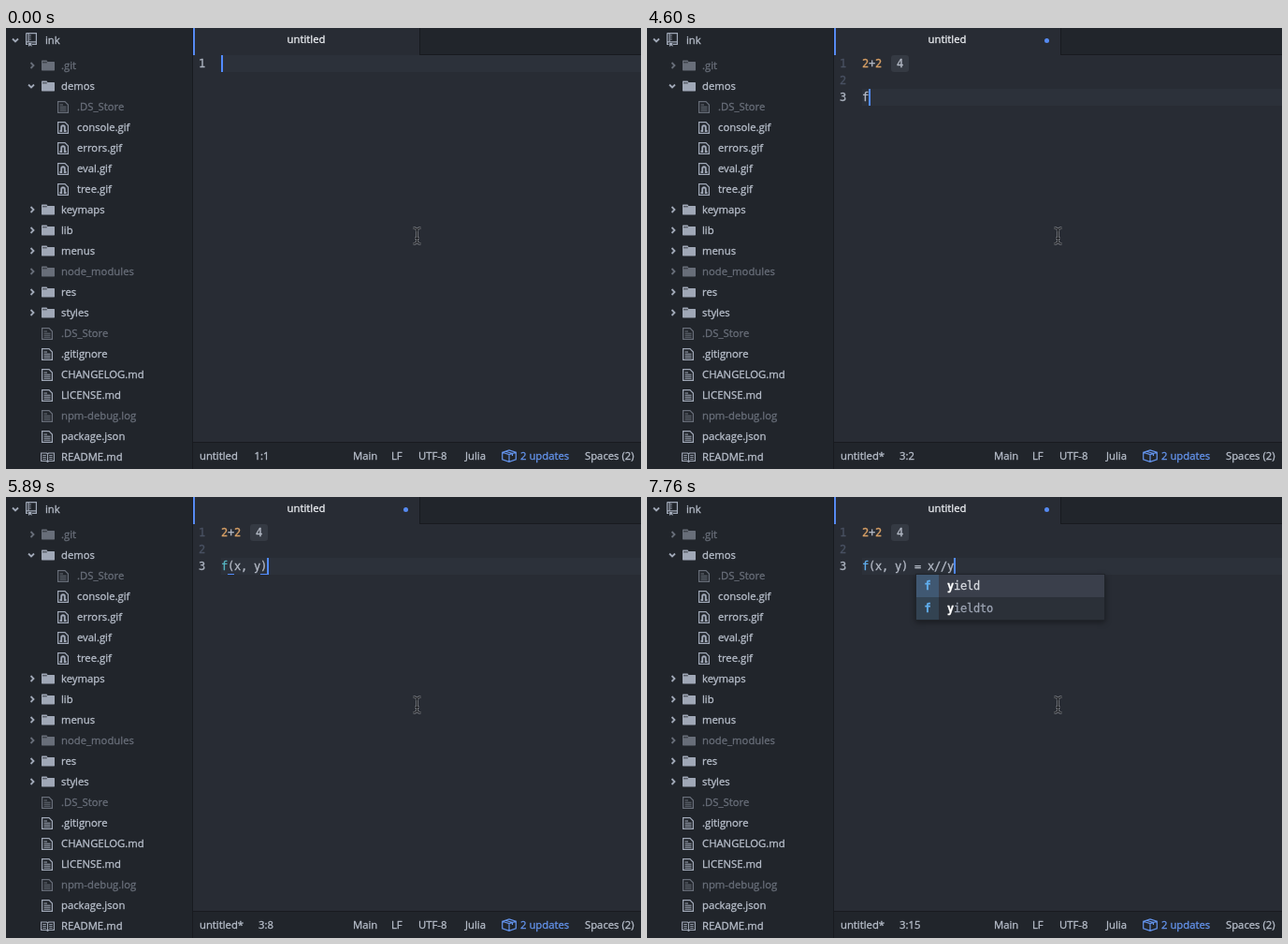
An HTML page that plays this animation: 679x471 px, repeating every 8000 ms.

```html
<!DOCTYPE html>
<html lang="en">
<head>
<meta charset="utf-8">
<title>Editor</title>
<style>
html, body { margin: 0; width: 100%; height: 100%; overflow: hidden; background: #282c34; }
body { position: relative; font: 11.3px/22px "Open Sans", "Noto Sans", sans-serif; color: #b8bfcb; -webkit-text-stroke: .3px; }
div, svg { position: absolute; }
div { white-space: pre; }
#tree { left: 0; top: 0; width: 199px; height: 471px; background: #21252b; border-right: 1px solid #181a1f; }
#tree svg { color: #a0a8b7; }
.dim, #tree .dim svg { color: #686e79; }
#bar { left: 442px; top: 0; width: 237px; height: 29px; background: #21252b; border: solid #181a1f; border-width: 0 0 1px 1px; box-sizing: border-box; }
#edge { left: 200px; top: 0; width: 2px; height: 29px; background: #568af2; }
#title { left: 200px; top: 1px; width: 242px; text-align: center; color: #eef0f4; }
#dot { left: 424.5px; top: 10.5px; width: 5px; height: 5px; border-radius: 50%; background: #568af2; }
#status { left: 200px; top: 442px; width: 479px; height: 28px; background: #21252b; border-top: 1px solid #181a1f; }
#status div { top: 3px; }
#status .blue { color: #6494ed; }
.code, .code div { font: 12px/18px "DejaVu Sans Mono", monospace; letter-spacing: -.224px; }
.code { color: #b4bac6; }
#active { left: 230px; width: 449px; height: 18px; background: #2c313a; }
#caret { width: 2px; height: 18px; background: #528bff; }
#nums { left: 0; top: 0; }
.num { left: 206px; color: #495162; }
.num.on { color: #abb2bf; }
.n { color: #d8a066; }
.call { color: #56b6c2; }
.def { color: #61afef; }
.pair { display: inline-block; height: 18px; vertical-align: top; box-shadow: inset 0 -1px #528bff; }
#result { left: 261px; top: 29px; width: 19px; height: 18px; border-radius: 3px; background: #353a43; text-indent: 6px; }
#popup { top: 83px; background: #2b3038; box-shadow: 0 0 0 1px #20242a, 0 2px 6px 1px #0006; }
#popup .row { left: 0; width: 100%; height: 24px; line-height: 24px; color: #9da5b4; }
#popup .row:first-child { background: #3a3f4b; color: #d7dae0; }
#popup .kind { left: 0; width: 24px; height: 24px; line-height: 24px; text-align: center; background: #334352; color: #61afef; font-weight: bold; }
#popup .row:first-child .kind { background: #405872; }
#popup .word { left: 33px; line-height: 24px; }
#popup b { color: #fff; }
</style>
</head>
<body>
<svg width="0" height="0">
  <symbol id="down" viewBox="0 0 8 8"><path d="M1 2.5 4 5.5 7 2.5" fill="none" stroke="currentColor" stroke-width="1.8"/></symbol>
  <symbol id="right" viewBox="0 0 8 8"><path d="M2.5 1 5.5 4 2.5 7" fill="none" stroke="currentColor" stroke-width="1.8"/></symbol>
  <symbol id="folder" viewBox="0 0 14 12"><path d="M0 1 .5 .5H5.5L6.5 2H13.5L14 2.5V11L13.5 11.5H.5L0 11Z" fill="currentColor"/><path d="M1 2.8H5.8" stroke="#21252b" stroke-width=".8"/></symbol>
  <symbol id="file" viewBox="0 0 12 13"><path d="M.6.6H8L11.4 4V12.4H.6Z" fill="none" stroke="currentColor" stroke-width="1.2"/><path d="M2.5 4H6M2.5 6.2H9.5M2.5 8.2H9.5M2.5 10.2H9.5" stroke="currentColor"/></symbol>
  <symbol id="media" viewBox="0 0 12 13"><path d="M.6.6H8L11.4 4V12.4H.6Z" fill="none" stroke="currentColor" stroke-width="1.2"/><path d="M2.5 10H4.2V6Q4.2 4.2 6 4.2T7.8 6V10H9.5" fill="none" stroke="currentColor" stroke-width="1.9"/></symbol>
  <symbol id="book" viewBox="0 0 15 11"><path d="M.6 1H6.5L7.5 2 8.5 1H14.4V9.5H8.5L7.5 10.5 6.5 9.5H.6ZM7.5 2V10" fill="none" stroke="currentColor" stroke-width="1.1"/><path d="M2.3 3.5H5.8M2.3 5.5H5.8M2.3 7.5H5.8M9.2 3.5H12.7M9.2 5.5H12.7M9.2 7.5H12.7" stroke="currentColor" stroke-width=".9"/></symbol>
  <symbol id="repo" viewBox="0 0 12 15"><path d="M.6.6H11.4V12.4H7M2.5 12.4H.6V.6M.6 9.8H11.4M3 .6V9.8" fill="none" stroke="currentColor" stroke-width="1.2"/><path d="M3 11H6.4V15L4.7 13.5 3 15ZM4.3 2.2H5.5V3.4H4.3ZM4.3 4.4H5.5V5.6H4.3ZM4.3 6.6H5.5V7.8H4.3Z" fill="currentColor"/></symbol>
  <symbol id="box" viewBox="0 0 16 14"><path d="M.7 3.2 8 1 15.3 3.2V10.8L8 13.3.7 10.8ZM.7 3.2 8 5.6 15.3 3.2M8 5.6V13.3M4 2.2 11.5 4.5V7" fill="none" stroke="currentColor" stroke-width="1.2"/></symbol>
</svg>

<div id="tree"></div>
<div id="bar"></div>
<div id="edge"></div>
<div id="title">untitled</div>
<div id="dot"></div>

<div class="code" style="left:0;top:0">
  <div id="active"></div>
  <div id="nums"></div>
  <div id="line1" style="left:230px;top:29px"></div>
  <div id="line3" style="left:230px;top:65px"></div>
  <div id="result">4</div>
  <div id="caret"></div>
</div>

<svg style="left:434px;top:212px" width="11" height="20" viewBox="0 0 11 20" fill="none">
  <path id="beam" d="M1.5 1.8H3.5L5.5 3.5 7.5 1.8H9.5M5.5 3.5V16.5M1.5 18.2H3.5L5.5 16.5 7.5 18.2H9.5M3.5 12.5H7.5" stroke="#8e9197" stroke-width="2.6"/>
  <path d="M1.5 1.8H3.5L5.5 3.5 7.5 1.8H9.5M5.5 3.5V16.5M1.5 18.2H3.5L5.5 16.5 7.5 18.2H9.5M3.5 12.5H7.5" stroke="#15171b" stroke-width="1.2"/>
</svg>

<div id="status">
  <div id="name" style="left:7px"></div>
  <div id="pos"></div>
  <div style="left:171px">Main</div>
  <div style="left:212px">LF</div>
  <div style="left:241px">UTF-8</div>
  <div style="left:291px">Julia</div>
  <svg class="blue" style="left:330px;top:7px" width="16" height="14"><use href="#box"/></svg>
  <div class="blue" style="left:350px">2 updates</div>
  <div style="left:419px">Spaces (2)</div>
</div>
<div id="popup" class="code"></div>

<script>
const $ = id => document.getElementById(id);

// Sidebar: a leading "-" marks an ignored entry
const size = { down: [8, 8], right: [8, 8], folder: [14, 12], file: [12, 13], media: [12, 13], book: [15, 11], repo: [12, 15] };
const icon = (id, cx, cy) => {
  const [w, h] = size[id];
  return `<svg style="left:${cx - w / 2}px;top:${cy - h / 2}px" width="${w}" height="${h}"><use href="#${id}"/></svg>`;
};
const label = (text, x, cy) => `<div style="left:${x}px;top:${cy - 11}px">${text}</div>`;
const entries = [
  'right -.git', 'down demos', 'sub file -.DS_Store', 'sub media console.gif', 'sub media errors.gif',
  'sub media eval.gif', 'sub media tree.gif', 'right keymaps', 'right lib', 'right menus',
  'right -node_modules', 'right res', 'right styles', 'file -.DS_Store', 'file .gitignore',
  'file CHANGELOG.md', 'file LICENSE.md', 'file -npm-debug.log', 'file package.json', 'book README.md'
];
$('tree').innerHTML = icon('down', 10, 13) + icon('repo', 27, 12.5) + label('ink', 42, 13) +
  entries.map((entry, i) => {
    const parts = entry.split(' '), y = 40 + 22 * i;
    const dx = parts[0] === 'sub' ? 17 : 0;
    if (dx) parts.shift();
    const [kind, raw] = parts, dim = raw[0] === '-';
    const folder = kind === 'right' || kind === 'down';
    const art = folder ? icon(kind, kind === 'down' ? 27 : 28, y - .5) + icon('folder', 45, y - .5) : icon(kind, 44 + dx, y);
    return `<div class="${dim ? 'dim' : ''}" style="left:0;top:0">${art}${label(dim ? raw.slice(1) : raw, 59 + dx, y)}</div>`;
  }).join('');

const words = {
  f: ['factor', 'factorial', 'falses', 'fetch', 'fft', 'fftshift', 'fieldnames', 'filter', 'finalize', 'find'],
  x: ['xcorr', 'xdump'],
  y: ['yield', 'yieldto']
};

// time, line, typed text, caret shown, popup prefix
const steps = [
  [0, 1, '', 1], [180, 1, '', 0], [570, 1, '', 1],
  [620, 1, '2', 1], [860, 1, '2+', 1], [1160, 1, '2+2', 1],
  [1980, 1, '2+2', 0], [2400, 1, '2+2', 1],
  [2640, 2, '', 1], [2820, 3, '', 1], [3360, 3, '', 0], [3750, 3, '', 1], [4200, 3, '', 0], [4550, 3, '', 1],
  [4600, 3, 'f', 1], [4720, 3, 'f', 1, 'f'], [4840, 3, 'f(', 1],
  [5080, 3, 'f(x', 1], [5170, 3, 'f(x,', 1], [5350, 3, 'f(x, ', 1],
  [5530, 3, 'f(x, y', 1], [5650, 3, 'f(x, y', 1, 'y'], [5890, 3, 'f(x, y)', 1],
  [6130, 3, 'f(x, y) ', 1], [6340, 3, 'f(x, y) =', 1], [6510, 3, 'f(x, y) = ', 1],
  [6930, 3, 'f(x, y) = x', 1], [7050, 3, 'f(x, y) = x', 1, 'x'],
  [7200, 3, 'f(x, y) = x/', 1], [7350, 3, 'f(x, y) = x//', 1],
  [7650, 3, 'f(x, y) = x//y', 1], [7760, 3, 'f(x, y) = x//y', 1, 'y']
];

function paintCall(text) {
  const open = text.includes('(') && !text.includes(')');
  const paired = open || text.endsWith(')');
  let html = (text + (open ? ')' : '')).replace(/^f/, text.includes('=') ? '<span class="def">f</span>'
    : text.includes('(') ? '<span class="call">f</span>' : 'f');
  if (paired) html = html.replace(/[()]/g, '<span class="pair">$&</span>');
  return html;
}

function paintPopup(prefix, caretX) {
  const list = words[prefix], box = $('popup');
  box.style.display = list ? 'block' : 'none';
  if (!list) return;
  box.style.left = caretX - 40 + 'px';
  box.style.width = (prefix === 'f' ? 204 : 201) + 'px';
  box.style.height = list.length * 24 + 'px';
  box.innerHTML = list.map((word, i) =>
    `<div class="row" style="top:${i * 24}px"><div class="kind">f</div><div class="word"><b>${prefix}</b>${word.slice(1)}</div></div>`).join('');
}

function paint([, line, text, shown, prefix], dirty) {
  const x = 230 + 7 * text.length, y = 11 + 18 * line;
  $('active').style.top = $('caret').style.top = y + 'px';
  $('caret').style.left = x + 'px';
  $('caret').style.opacity = shown;
  $('nums').innerHTML = [1, 2, 3].slice(0, line).map(n =>
    `<div class="num ${n === line ? 'on' : ''}" style="top:${11 + 18 * n}px">${n}</div>`).join('');
  $('line1').innerHTML = (line === 1 ? text : '2+2').replace(/2/g, '<span class="n">2</span>');
  $('line3').innerHTML = line === 3 ? paintCall(text) : '';
  $('dot').style.opacity = +dirty;
  $('name').textContent = dirty ? 'untitled*' : 'untitled';
  $('pos').textContent = `${line}:${text.length + 1}`;
  $('pos').style.left = (dirty ? 70 : 65.5) + 'px';
  paintPopup(prefix, x);
}

let last = '';
function tick() {
  const t = performance.now() % 8000;
  const i = steps.findLastIndex(s => s[0] <= t), dirty = t >= 1460;
  $('result').style.opacity = Math.min(1, Math.max(0, (t - 1480) / 270));
  const key = i + '/' + dirty;
  if (key !== last) paint(steps[i], dirty);
  last = key;
  requestAnimationFrame(tick);
}
tick();
</script>
</body>
</html>
```
